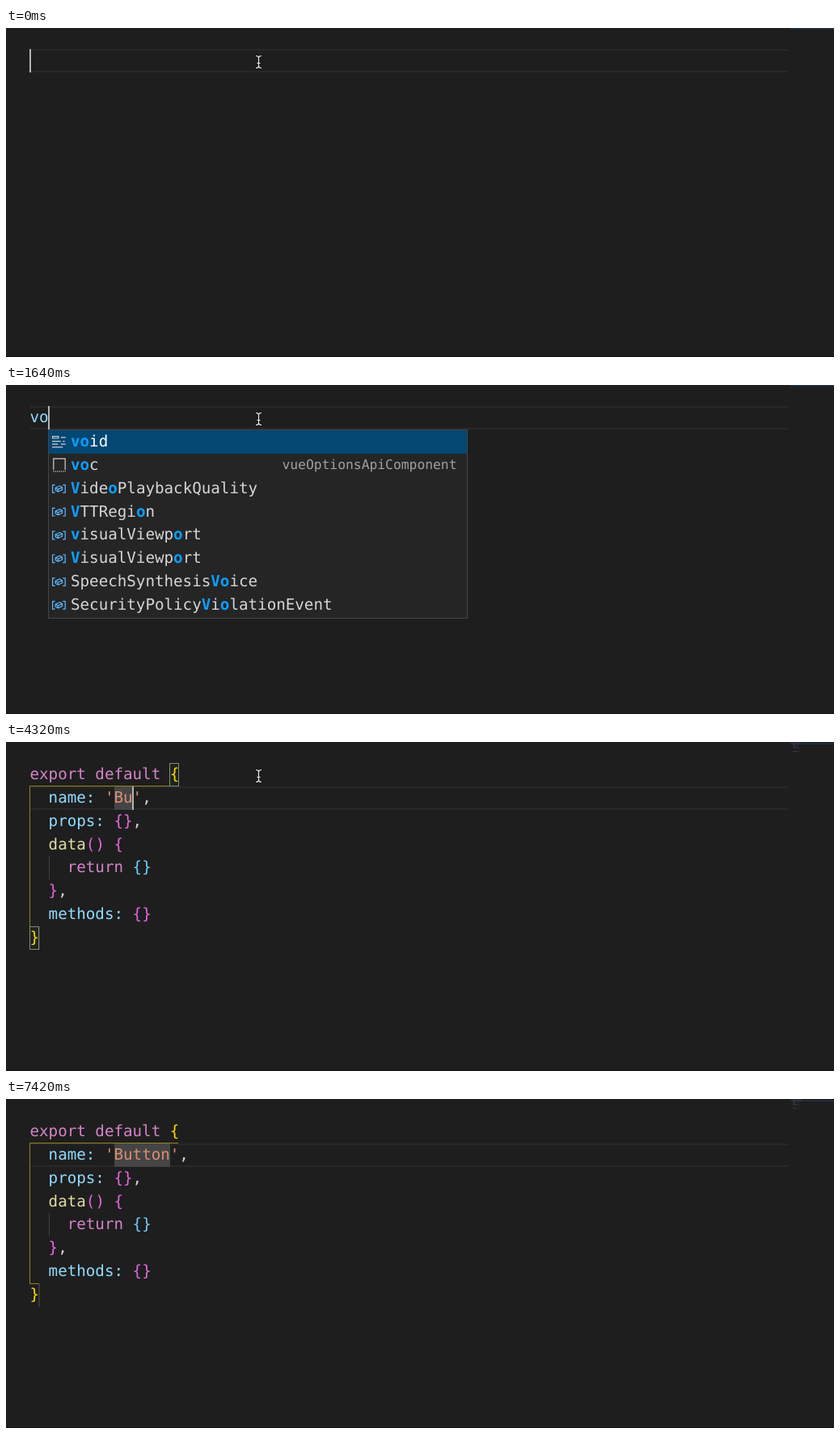
An HTML page that plays this animation: 1024 px wide and 407 px high, repeating every 7.52 s.

```html
<!DOCTYPE html>
<html lang="en">
<head>
<meta charset="utf-8">
<title>Snippet completion</title>
<style>
  html, body { margin: 0; width: 100%; height: 100%; overflow: hidden; background: #1e1e1e; }
  svg { display: block; width: 1024px; height: 407px; }
  text { font: 19.2px "DejaVu Sans Mono", monospace; white-space: pre; fill: #d6d6d6; text-rendering: geometricPrecision; }
  .detail { font-size: 16.32px; text-anchor: end; fill: #a0a0a0; }
  .match { fill: #0a9fff; font-weight: bold; }
</style>
</head>
<body>
<svg id="stage" viewBox="0 0 1024 407"></svg>
<script>
const LOOP = 7520, LEFT = 29.5, CHAR = 11.56, LINE = 28.8, TOP = 26;
const COLOR = {
  key: '#d484c9', prop: '#90dcff', func: '#dfdda3', str: '#da8f73', plain: '#d6d6d6',
  gold: '#ffd800', orchid: '#e667dd', sky: '#6fcfff'
};

const rect = (x, y, w, h, fill, more = '') =>
  `<rect x="${x}" y="${y}" width="${w}" height="${h}" fill="${fill}" ${more}/>`;
const frame = (x, y, w, h, fill, stroke) =>
  rect(x + .5, y + .5, w - 1, h - 1, fill, `stroke="${stroke}"`);
const text = (x, y, body, more = '') => `<text x="${x}" y="${y}" ${more}>${body}</text>`;
const span = (color, body) => `<tspan fill="${COLOR[color]}">${body}</tspan>`;
const path = (d, stroke, more = '') => `<path d="${d}" fill="none" stroke="${stroke}" ${more}/>`;

// Icons on a 16 unit grid
const ICONS = {
  word: path('M10 3.5h5M12 7.5h2M1 7.5h9M1 10.5h6M10 10.5h5M1 13.5h11M1.5 2.5h6v2h-6z', '#cfcfcf'),
  value: path('M4 4.5H1.5v8H4M12 4.5h2.5v8H12M9 5.5l2.5 1.5v2.5L7 11.5 4.5 10V7.5zM4.5 7.5L7 9l4.5-2M7 9v2.5', '#5fb9ff'),
  snip: path('M2.5 13V1.5h12V13', '#d0d0d0') + path('M2 14.5h13', '#d0d0d0', 'stroke-dasharray="1 1"'),
  type: path('M5.3 1.4l2 2-3.9 3.9-2-2zM5.3 6v6.3h5.2M5.3 7.3h5.2M13 5.4l1.3 1.3-2.6 2.6L10.4 8zM13 10.4l1.3 1.3-2.6 2.6-1.3-1.3z', '#f0a030')
};

// Rows: icon, label with matched letters in brackets, optional detail
const LISTS = {
  v: [
    ['word', '[v]ar'], ['value', '[v]isualViewport'], ['word', '[v]oid'],
    ['snip', '[v]cac', 'vueCompositionApiAsyncComponent'],
    ['snip', '[v]cc', 'vueCompositionApiComponent'],
    ['snip', '[v]oc', 'vueOptionsApiComponent'],
    ['value', '[V]BArray'], ['value', '[V]TTCue'], ['value', '[V]TTRegion'],
    ['value', '[V]alidityState'], ['type', '[V]arDate'], ['value', '[V]ideoPlaybackQuality']
  ],
  vo: [
    ['word', '[vo]id'], ['snip', '[vo]c', 'vueOptionsApiComponent'],
    ['value', '[V]ide[o]PlaybackQuality'], ['value', '[V]TTRegi[o]n'],
    ['value', '[v]isualViewp[o]rt'], ['value', '[V]isualViewp[o]rt'],
    ['value', 'SpeechSynthesis[Vo]ice'], ['value', 'SecurityPolicy[V]i[o]lationEvent']
  ],
  voc: [
    ['snip', '[voc]', 'vueOptionsApiComponent'],
    ['value', '[V]ide[o]Playba[c]kQuality'], ['value', 'SpeechSynthesis[Vo]i[c]e']
  ]
};

function component(tab, name, paired) {
  const [outer, inner, deep] = paired ? ['gold', 'orchid', 'sky'] : ['plain', 'plain', 'plain'];
  return [
    span('key', 'export default ') + span(outer, '{'),
    tab + span('prop', 'name: ') + span('str', `'${name}'`) + ',',
    tab + span('prop', 'props: ') + span(inner, '{}') + ',',
    tab + span('func', 'data') + span(inner, '() {'),
    tab + tab + span('key', 'return ') + span(deep, '{}'),
    tab + span(inner, '}') + ',',
    tab + span('prop', 'methods: ') + span(inner, '{}'),
    span(outer, '}')
  ];
}

const write = (lines, x, y, step) => lines.map((line, i) => text(x, y + step * i, line)).join('');

function suggestions(word) {
  const x = Math.floor(LEFT + word.length * CHAR), rows = LISTS[word];
  let out = frame(x, 55, 519, Math.round(LINE * rows.length + 4), '#252526', '#454545')
    + rect(x + 1, 56, 517, 29, '#034773');
  rows.forEach(([icon, label, detail], i) => {
    const y = 76.2 + LINE * i;
    const body = label.replace(/\[(.+?)\]/g, '<tspan class="match">$1</tspan>');
    out += `<g transform="translate(${x + 3.8} ${y - 15.6}) scale(1.2)">${ICONS[icon]}</g>`
      + text(x + 28, y, body, i ? '' : 'style="fill:#fff"');
    if (detail) out += text(x + 505.5, y - .8, detail, `class="detail" ${i ? '' : 'style="fill:#bccbd6"'}`);
  });
  return out;
}

function details() {
  return frame(581, 55, 399, 311, '#252526', '#454545')
    + `<g opacity=".72">${write(['Create a vue options api compon', 'ent (Vue3 Snippets)'], 588, 81, 28)}</g>`
    + write(component('    ', '', false), 588, 156, 28)
    + path('M957.5 66.5l9 9m0-9l-9 9', '#d0d0d0', 'stroke-width="1.2"');
}

function guides(t) {
  const paired = t >= 3280;
  let out = paired
    ? path('M213 54.5H29.5V228.5H41', '#96831a')
    : path('M29.5 55V228', '#707070');
  out += path('M53.5 141V170', '#404040') + path('M41 228V257', '#525252');
  if (t < 7420)
    out += frame(202, 26, 12, 29, '#1b251b', '#888') + frame(29, 228, 12, 29, '#1b251b', '#888');
  return out;
}

function pointer(t) {
  const step = Math.max(0, Math.min(7, Math.floor((t - 6120) / 150) + 1)) / 7;
  const p = step * step * (3 - 2 * step);
  const d = 'M-3.5-7.5q3 0 3.5 2q.5-2 3.5-2M0-6V6M-3.5 7.5q3 0 3.5-2q.5 2 3.5 2M-2 1.5h4';
  return `<g transform="translate(${312.5 + 628 * p} ${42 + 378 * p})">`
    + path(d, '#111', 'stroke-width="2.6"') + path(d, '#f2f2f2', 'stroke-width="1.2"') + '</g>';
}

const count = (t, times) => times.filter(at => t >= at).length;
const HIDDEN = [[440, 890], [2680, 3130], [3580, 4020], [5520, 6120], [6570, 7020], [7420, LOOP]];

function scene(t) {
  const expanded = t >= 3130, row = expanded ? 1 : 0, y = TOP + LINE * row;
  const word = 'voc'.slice(0, count(t, [1190, 1640, 2080]));
  const name = 'Button'.slice(0, count(t, [4020, 4320, 4620, 4770, 4920, 5070]));
  const lines = expanded ? component('  ', name, t >= 3280) : [span('prop', word)];
  const column = expanded ? 9 + name.length : word.length;
  const code = write(lines, LEFT, TOP + 20.2, LINE);

  let out = rect(0, 0, 1024, 407, '#1e1e1e') + rect(0, 406, 1024, 1, '#121212')
    + rect(30, Math.round(y), 937, 2, '#282828') + rect(30, Math.round(y) + 27, 937, 2, '#282828')
    + rect(970, 1.6 * row, 54, 1.2, '#1d3a57');
  if (expanded) out += guides(t);
  if (name) out += rect(134, 55, Math.round(name.length * CHAR), 29, '#454545');
  out += code
    + `<g transform="translate(969.5 -1.6) scale(.069 .0625)" opacity=".7">${code}</g>`;
  if (!HIDDEN.some(([from, to]) => t >= from && t < to))
    out += rect(Math.floor(LEFT + column * CHAR), Math.round(y), 2, 29, '#b4b5b3');
  if (word && !expanded) out += suggestions(word);
  if (t >= 2230 && !expanded) out += details();
  return out + pointer(t);
}

const stage = document.getElementById('stage');
const start = performance.now();
let shown = '';
function draw() {
  const next = scene((performance.now() - start) % LOOP);
  if (next !== shown) stage.innerHTML = shown = next;
  requestAnimationFrame(draw);
}
draw();
</script>
</body>
</html>
```
